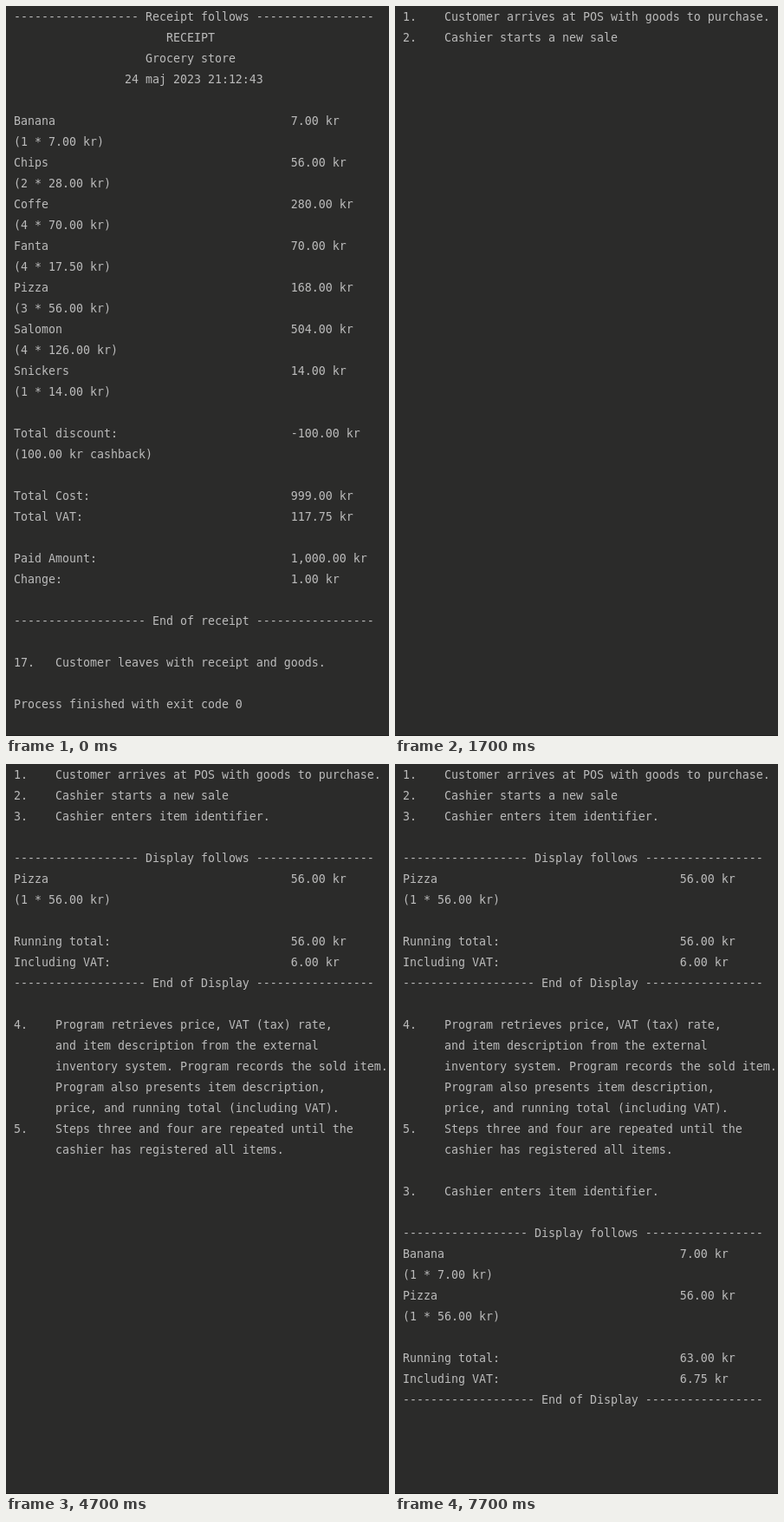
Animation, 442 px wide and 841 px high, one loop 8000 ms. Source, as an HTML page:

```html
<!DOCTYPE html>
<html lang="en">
<head>
<meta charset="utf-8">
<title>Grocery store console</title>
<style>
  html, body {
    margin: 0;
    width: 100%;
    height: 100%;
    overflow: hidden;
    background: #2b2b2a;
  }
  body {
    position: relative;
    box-sizing: border-box;
    border-bottom: 1px solid #1e1e1e;
  }
  /* the outer font only sets the baseline of each row */
  pre {
    --row: 24px;
    position: absolute;
    left: 9px;
    top: 0;
    margin: 0;
    overflow: hidden;
    color: #bbb;
    font: 13.3333px/var(--row) "Noto Sans Mono", monospace;
    tab-size: 40;
  }
  /* 0.602em advance gives an 8px character cell */
  code {
    font: 13.29px/0 "DejaVu Sans Mono", monospace;
    font-variant-ligatures: none;
  }
  .receipt { animation: clear 8s step-end infinite; }
  .log { height: 0; animation: print 8s step-end infinite; }

  @keyframes clear {
    0% { visibility: visible; }
    6.25%, 100% { visibility: hidden; }
  }
  /* the log grows by whole rows */
  @keyframes print {
    0% { height: 0; }
    8.75% { height: var(--row); }
    21.25% { height: calc(2 * var(--row)); }
    33.75% { height: calc(3 * var(--row)); }
    46.25% { height: calc(17 * var(--row)); }
    58.75% { height: calc(19 * var(--row)); }
    83.75% { height: calc(21 * var(--row)); }
    96.25%, 100% { height: calc(31 * var(--row)); }
  }
</style>
</head>
<body>
<pre class="receipt"><code>------------------ Receipt follows -----------------
                      RECEIPT
                   Grocery store
                24 maj 2023 21:12:43

Banana&#9;7.00 kr
(1 * 7.00 kr)
Chips&#9;56.00 kr
(2 * 28.00 kr)
Coffe&#9;280.00 kr
(4 * 70.00 kr)
Fanta&#9;70.00 kr
(4 * 17.50 kr)
Pizza&#9;168.00 kr
(3 * 56.00 kr)
Salomon&#9;504.00 kr
(4 * 126.00 kr)
Snickers&#9;14.00 kr
(1 * 14.00 kr)

Total discount:&#9;-100.00 kr
(100.00 kr cashback)

Total Cost:&#9;999.00 kr
Total VAT:&#9;117.75 kr

Paid Amount:&#9;1,000.00 kr
Change:&#9;1.00 kr

------------------- End of receipt -----------------

17.   Customer leaves with receipt and goods.

Process finished with exit code 0</code></pre>
<pre class="log"><code>1.    Customer arrives at POS with goods to purchase.
2.    Cashier starts a new sale
3.    Cashier enters item identifier.

------------------ Display follows -----------------
Pizza&#9;56.00 kr
(1 * 56.00 kr)

Running total:&#9;56.00 kr
Including VAT:&#9;6.00 kr
------------------- End of Display -----------------

4.    Program retrieves price, VAT (tax) rate,
      and item description from the external
      inventory system. Program records the sold item.
      Program also presents item description,
      price, and running total (including VAT).
5.    Steps three and four are repeated until the
      cashier has registered all items.

3.    Cashier enters item identifier.

------------------ Display follows -----------------
Banana&#9;7.00 kr
(1 * 7.00 kr)
Pizza&#9;56.00 kr
(1 * 56.00 kr)

Running total:&#9;63.00 kr
Including VAT:&#9;6.75 kr
------------------- End of Display -----------------</code></pre>
</body>
</html>
```
